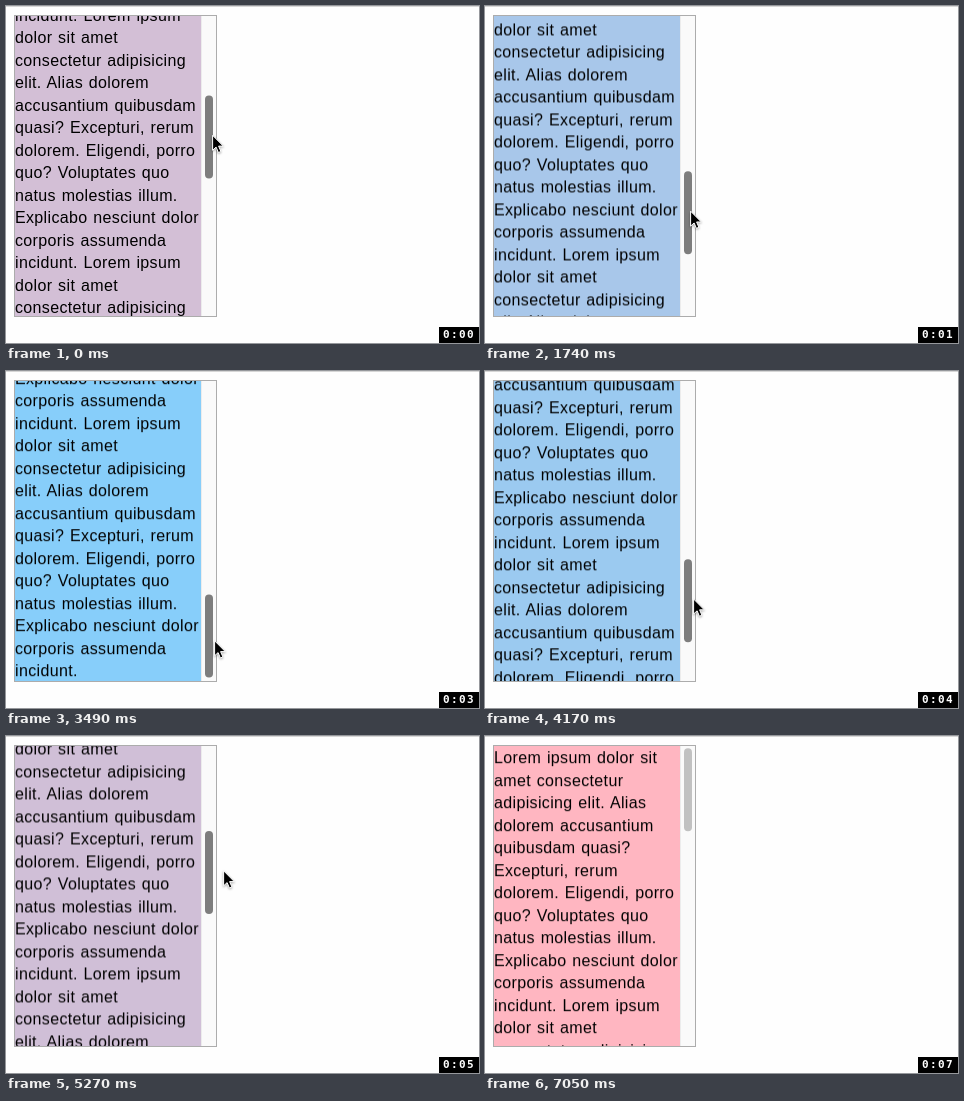
An HTML page for the animation above (7430 ms loop, 473 px wide and 337 px high).

```html
<!DOCTYPE html>
<html lang="en">
<head>
<meta charset="utf-8">
<title>Scroll-driven background</title>
<style>
  html, body { margin: 0; width: 100%; height: 100%; overflow: hidden; background: #fefefe; }
  body { position: relative; box-sizing: border-box; border-top: 1px solid #d6d6d6; }
  body > *, #box > * { position: absolute; }
  #box { left: 8px; top: 8px; width: 201px; height: 300px; border: 1px solid #acacac; overflow: hidden; background: #fafafa; }
  #pane { left: 0; top: 0; width: 186px; height: 300px; overflow: hidden; }
  #text { position: relative; top: 1px; font: 16px/22.5px "Liberation Sans", sans-serif;
    letter-spacing: .35px; word-spacing: 1px; color: #000; white-space: pre; will-change: transform; }
  #track { left: 186px; top: 0; width: 14px; height: 300px; border-left: 1px solid #ececec; }
  #thumb { left: 190px; top: 0; width: 8px; height: 83px; border-radius: 4px; }
  #cursor { left: 0; top: 0; overflow: visible; filter: drop-shadow(0 1px 1px #0005); }
  #clock { left: 433px; top: 320px; width: 36px; height: 16px; padding-left: 4px; background: #000; color: #fff;
    font: bold 11px/16px "DejaVu Sans Mono", monospace; letter-spacing: 1.4px; white-space: nowrap; overflow: hidden; }
</style>
</head>
<body>
<div id="box">
  <div id="pane"><div id="text"></div></div>
  <div id="track"></div>
  <div id="thumb"></div>
</div>
<svg id="cursor" width="13" height="19">
  <path d="M.6 .8v15l3.5-3.2 2.3 5.4 2.5-1-2.3-5.4h4.7z" fill="#000" stroke="#fff"/>
</svg>
<div id="clock"></div>
<script>
const LOOP = 7430, RELEASE = 6510, MAX_SCROLL = 712, RATIO = 3.37, GRAB_Y = 50.3;
const $ = id => document.getElementById(id);
const clamp = (v, lo, hi) => Math.min(hi, Math.max(lo, v));
const mix = (a, b, p) => a + (b - a) * p;

const opening = `Lorem ipsum dolor sit
amet consectetur
adipisicing elit. Alias
dolorem accusantium
quibusdam quasi?
Excepturi, rerum
`;
const tail = `dolorem. Eligendi, porro
quo? Voluptates quo
natus molestias illum.
Explicabo nesciunt dolor
corporis assumenda
`;
const repeat = `incidunt. Lorem ipsum
dolor sit amet
consectetur adipisicing
elit. Alias dolorem
accusantium quibusdam
quasi? Excepturi, rerum
${tail}`;
$('text').textContent = opening + tail + repeat.repeat(3) + 'incidunt.';

// Pointer path: time, x, y
const path = [
  [0, 206, 127.5], [90, 206, 127.5], [1020, 205, 172.1], [1740, 205, 203.3],
  [2620, 208, 243.3], [3160, 208, 265], [3280, 208, 268], [3490, 208, 268],
  [4170, 208, 226.3], [5270, 217, 133.1], [5740, 225, 92], [6400, 229, 49],
  [6600, 229, 43.5], [6750, 229, 43.5], [6880, 258, 130], [7040, 340, 338], [LOOP, 340, 338]
];

const slope = (i, k) => (path[i + 1][k] - path[i][k]) / (path[i + 1][0] - path[i][0]);

// Monotone tangent, so that holds stay still
function tangent(i, k) {
  if (i === 0 || i === path.length - 1) return 0;
  const a = slope(i - 1, k), b = slope(i, k);
  return a * b <= 0 ? 0 : 2 * a * b / (a + b);
}

function pointer(t, k) {
  let i = 0;
  while (i < path.length - 2 && t >= path[i + 1][0]) i++;
  const span = path[i + 1][0] - path[i][0], u = (t - path[i][0]) / span, v = 1 - u;
  return path[i][k] * v * v * (1 + 2 * u) + path[i + 1][k] * u * u * (3 - 2 * u)
    + span * u * v * (tangent(i, k) * v - tangent(i + 1, k) * u);
}

function draw(t) {
  const dragY = pointer(Math.min(t, RELEASE), 2);
  const scroll = clamp((dragY - GRAB_Y) * RATIO, 0, MAX_SCROLL), p = scroll / MAX_SCROLL;
  const gray = mix(125, 193, clamp((t - RELEASE) / 90, 0, 1));
  $('text').style.transform = `translateY(${-scroll}px)`;
  $('pane').style.background = `rgb(${mix(255, 135, p)}, ${mix(182, 206, p)}, ${mix(193, 250, p)})`;
  $('thumb').style.transform = `translateY(${2.3 + scroll / RATIO}px)`;
  $('thumb').style.background = `rgb(${gray}, ${gray}, ${gray})`;
  $('cursor').style.transform = `translate(${pointer(t, 1)}px, ${pointer(t, 2)}px)`;
  $('clock').textContent = '0:0' + Math.floor(t / 1000);
}

const start = performance.now();
function tick() {
  draw((performance.now() - start) % LOOP);
  requestAnimationFrame(tick);
}
tick();
</script>
</body>
</html>
```
